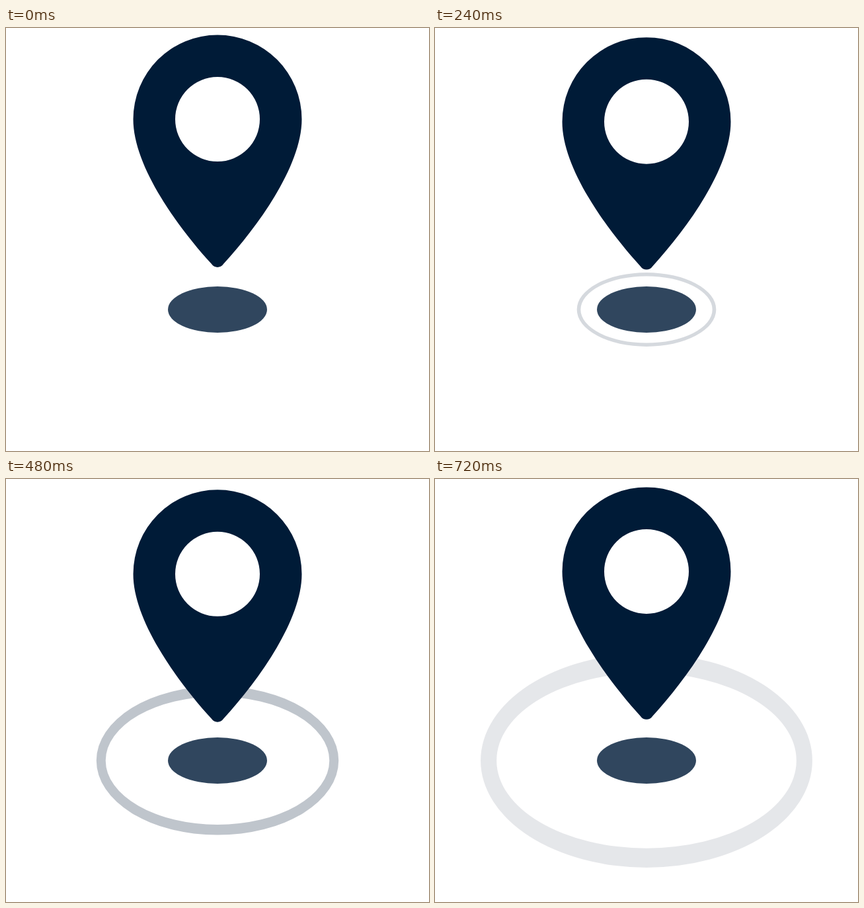
Animation, 640 px wide and 640 px high, one loop 800 ms. Source, as an HTML page:

```html
<!DOCTYPE html>
<html lang="en">
<head>
<meta charset="utf-8">
<title>Map pin</title>
<style>
  html, body { margin: 0; width: 100%; height: 100%; overflow: hidden; background: #fff; }
  svg { display: block; width: 100%; height: 100%; }
  #ring, #pin { fill: #001b37; fill-rule: evenodd; }
</style>
</head>
<body>
<svg viewBox="0 0 640 640">
  <path id="ring"/>
  <ellipse cx="320" cy="426" rx="75" ry="35" fill="#30465e"/>
  <path id="pin" d="M192.5 138A127.5 127.5 0 0 1 447.5 138C447.5 208 382 299 329 357C324.5 363.5 315.5 363.5 311 357C258 299 192.5 208 192.5 138ZM256 138a64 64 0 1 0 128 0a64 64 0 1 0 -128 0Z"/>
</svg>
<script>
  const STEP = 80;
  // Uneven progress of the motion at each step
  const progress = [0, 3.5, 7, 10, 13, 17, 20.7, 23.8, 27.9, 30];
  const ring = document.getElementById('ring');
  const pin = document.getElementById('pin');

  const ellipse = (rx, ry) =>
    `M${320 - rx} 426a${rx} ${ry} 0 1 0 ${2 * rx} 0a${rx} ${ry} 0 1 0 ${-2 * rx} 0Z`;

  function draw(u) {
    const drop = 3.02 * (1 + Math.cos(2 * Math.PI * (u - 18.2) / 38));
    pin.setAttribute('transform', `translate(0 ${drop.toFixed(2)})`);

    const alpha = Math.min(0.09 + 0.025 * (u - 7), 0.1 + 0.0163 * (30 - u), 0.3);
    const grow = 7.28 * (u - 7);
    const rx = 83.5 + grow;
    const ry = 40 + 0.728 * grow;
    const wx = 4 + 0.07 * grow + 0.0003 * grow * grow;
    const wy = 3.5 + 0.075 * grow + 0.00047 * grow * grow;
    const visible = rx > 75;
    ring.setAttribute('opacity', visible ? alpha : 0);
    if (visible) ring.setAttribute('d', ellipse(rx, ry) + ellipse(rx - wx, ry - wy));
  }

  function tick() {
    draw(progress[Math.floor(performance.now() / STEP) % progress.length]);
    requestAnimationFrame(tick);
  }
  tick();
</script>
</body>
</html>
```
